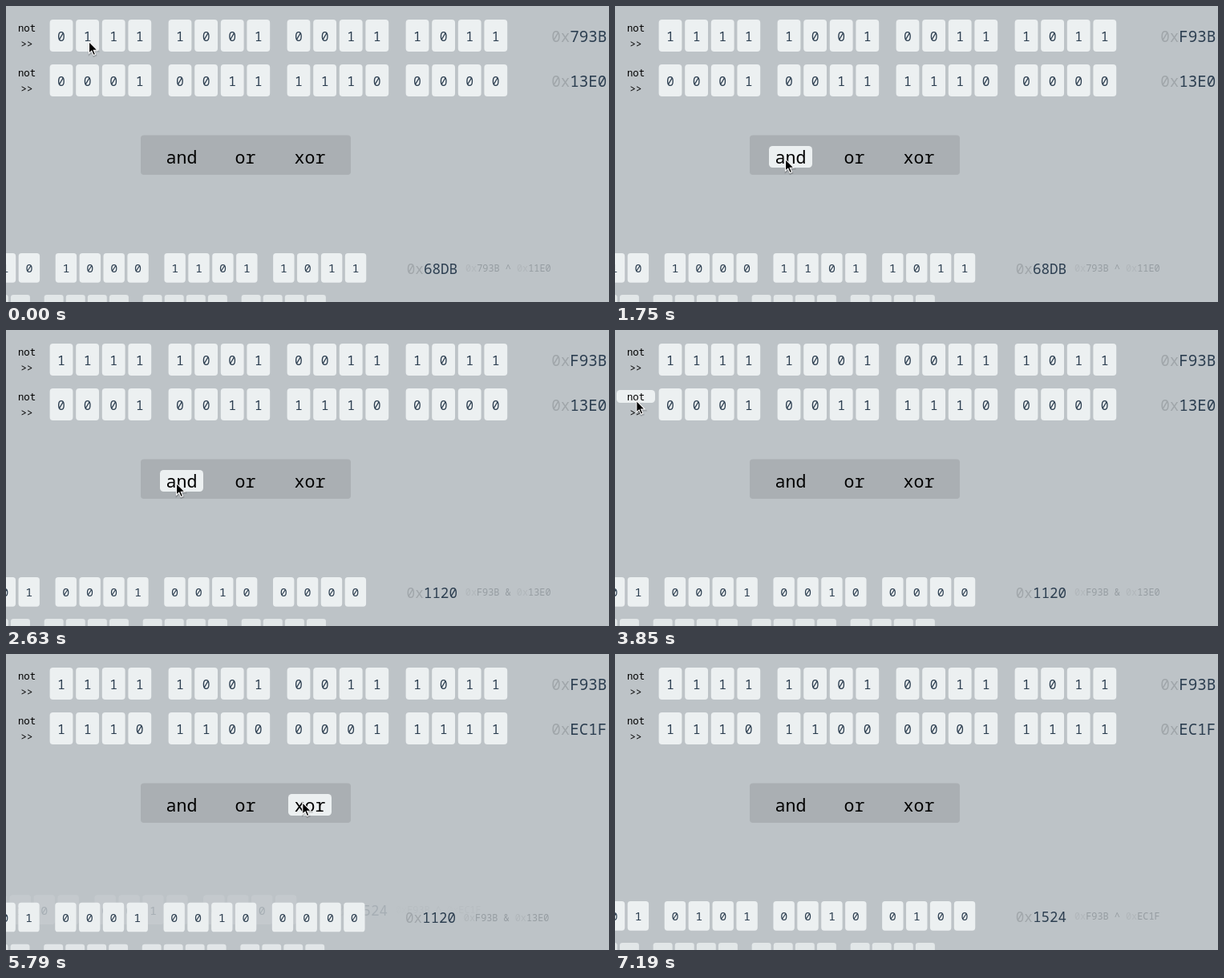
Recreate the animation shown at these times as an HTML page. Size 752 by 370 pixels, loop 7.54 s.

```html
<!DOCTYPE html>
<html lang="en">
<head>
<meta charset="utf-8">
<title>Bitwise calculator</title>
<style>
  html, body { margin: 0; width: 100%; height: 100%; overflow: hidden; background: #bdc3c7; }
  svg { display: block; width: 752px; height: 370px; }
  text { font-family: "Noto Sans Mono", "DejaVu Sans Mono", monospace; fill: #000; }
  .cell, .hot { fill: #ecf0f1; }
  .bit { font-size: 16.4px; text-anchor: middle; fill: #2c3e50; }
  .hex { font-size: 19.2px; fill: #2c3e50; }
  .hex .pre { fill: #a0a6aa; }
  .expr { font-size: 12.95px; fill: #969da2; }
  .expr .pre { fill: #b1b7bb; }
  .op { font-size: 21.6px; text-anchor: middle; }
  .tool { font-size: 12.3px; text-anchor: middle; }
</style>
</head>
<body>
<svg id="stage" viewBox="0 0 752 370"></svg>
<script>
const LOOP = 7540, TICKS = 86, STEP = LOOP / TICKS;
const stage = document.getElementById('stage');

function add(parent, tag, attrs = {}, text = '') {
  const el = document.createElementNS('http://www.w3.org/2000/svg', tag);
  for (const key in attrs) el.setAttribute(key, attrs[key]);
  el.textContent = text;
  return parent.appendChild(el);
}

function addHex(text, value) {
  add(text, 'tspan', { class: 'pre' }, '0x');
  return add(text, 'tspan', {}, value);
}

const toBits = hex => parseInt(hex, 16).toString(2).padStart(16, '0');

// A 16-bit row: cells, hex value and, for results, the expression behind it.
function makeRow(hex, expr) {
  const g = add(stage, 'g');
  const bits = [...toBits(hex)].map((bit, i) => {
    const x = (i >> 2) * 148 + (i & 3) * 32.6;
    add(g, 'rect', { class: 'cell', x, y: 0, width: 28.8, height: 40, rx: 4 });
    return add(g, 'text', { class: 'bit', x: x + 14.4, y: 26.6 }, bit);
  });
  const value = addHex(add(g, 'text', { class: 'hex', x: 625.7, y: 28 }), hex);
  if (expr) {
    const [a, op, b] = expr.split(' ');
    const text = add(g, 'text', { class: 'expr', x: 705.5, y: 25.2 });
    addHex(text, a);
    add(text, 'tspan', {}, ` ${op} `);
    addHex(text, b);
  }
  const show = next => {
    if (value.textContent === next) return;
    value.textContent = next;
    [...toBits(next)].forEach((bit, i) => bits[i].textContent = bit);
  };
  return { g, show };
}

const buttons = [];
function addButton(cls, label, x, y, width, height, baseline) {
  const hot = add(stage, 'rect', { class: 'hot', x, y, width, height, rx: 4.5 });
  add(stage, 'text', { class: cls, x: x + width / 2, y: baseline }, label);
  buttons.push({ hot, x, y, width, height });
}

// Newest first, so older results cover the one sliding in.
const results = [
  ['1524', 'F93B ^ EC1F'],
  ['1120', 'F93B & 13E0'],
  ['68DB', '793B ^ 11E0'],
  ['11E0', '']
].map(([hex, expr]) => makeRow(hex, expr).g);

const inputs = [17, 73].map((y, i) => {
  const row = makeRow(['793B', '13E0'][i]);
  row.g.setAttribute('transform', `translate(54.6 ${y})`);
  addButton('tool', 'not', 2, y + 2, 48, 16, y + 15);
  addButton('tool', '>>', 2, y + 22, 48, 16, y + 35);
  return row;
});

add(stage, 'rect', { x: 168, y: 161.5, width: 262, height: 49.5, rx: 4, fill: '#aaafb3' });
addButton('op', 'and', 192, 175, 54, 27, 197);
addButton('op', 'or', 278, 175, 41, 27, 197);
addButton('op', 'xor', 352, 175, 54, 27, 197);

const cursor = add(stage, 'g');
const arrow = 'M0 0V14.6L3.3 11.6L5.6 17L8.1 16L5.8 10.7H10.4Z';
add(cursor, 'path', { d: arrow, transform: 'translate(.4 1.2)', fill: 'none',
  stroke: '#000', 'stroke-opacity': .16, 'stroke-width': 2.4 });
add(cursor, 'path', { d: arrow, fill: '#000', stroke: '#fff', 'stroke-width': 1.1 });

const clamp = u => Math.max(0, Math.min(1, u));
const smooth = u => u * u * (3 - 2 * u);
const out = u => 1 - (1 - u) ** 3;

// Pointer moves: first tick, last tick, start, control, end, easing.
const moves = [
  [0, 5, [103.5, 44.5], [90, 43], [79, 41.5], smooth],
  [7, 20, [79, 41.5], [181, 111], [212.5, 191.5], smooth],
  [30, 44, [212.5, 191.5], [88, 167], [26.8, 88.3], out],
  [48, 61, [26.8, 88.3], [295, 152], [369.8, 185.5], smooth],
  [74, 82, [369.8, 185.5], [530, 265], [690, 390], smooth]
];

function pointer(k) {
  const [from, to, a, c, b, ease] = moves.filter(m => m[0] <= k).pop();
  const s = ease(clamp((k - from) / (to - from)));
  return [0, 1].map(i => (1 - s) ** 2 * a[i] + 2 * s * (1 - s) * c[i] + s * s * b[i]);
}

const arrival = (k, start) => smooth(clamp((k - start) / 3.9));

// Depth 0 is the current result; deeper ones sink, shrink and fade.
function place(g, depth, entry = 1) {
  const x = -74 - 1.3 * depth - 90 * (1 - entry);
  const y = 309 + 52 * depth - 8 * (1 - entry);
  g.setAttribute('transform', `translate(${x} ${y}) scale(${.917 - .086 * depth})`);
  g.setAttribute('opacity', entry ? (.12 + .88 * entry) * (1 - .2 * depth) : 0);
}

function draw(k) {
  inputs[0].show(k < 7 ? '793B' : 'F93B');
  inputs[1].show(k < 48 ? '13E0' : 'EC1F');

  const first = arrival(k, 26.2), second = arrival(k, 65.57);
  place(results[0], 0, second);
  place(results[1], second, first);
  place(results[2], first + second);
  place(results[3], first + second + 1);

  const [x, y] = pointer(k);
  cursor.setAttribute('transform', `translate(${x} ${y})`);
  for (const b of buttons) {
    const over = x >= b.x && x <= b.x + b.width && y >= b.y && y <= b.y + b.height;
    b.hot.setAttribute('visibility', over ? 'visible' : 'hidden');
  }
}

const start = performance.now();
function tick() {
  const t = (performance.now() - start) % LOOP;
  draw(Math.min(TICKS - 1, Math.floor((t + 20) / STEP)));
  requestAnimationFrame(tick);
}
tick();
</script>
</body>
</html>
```
